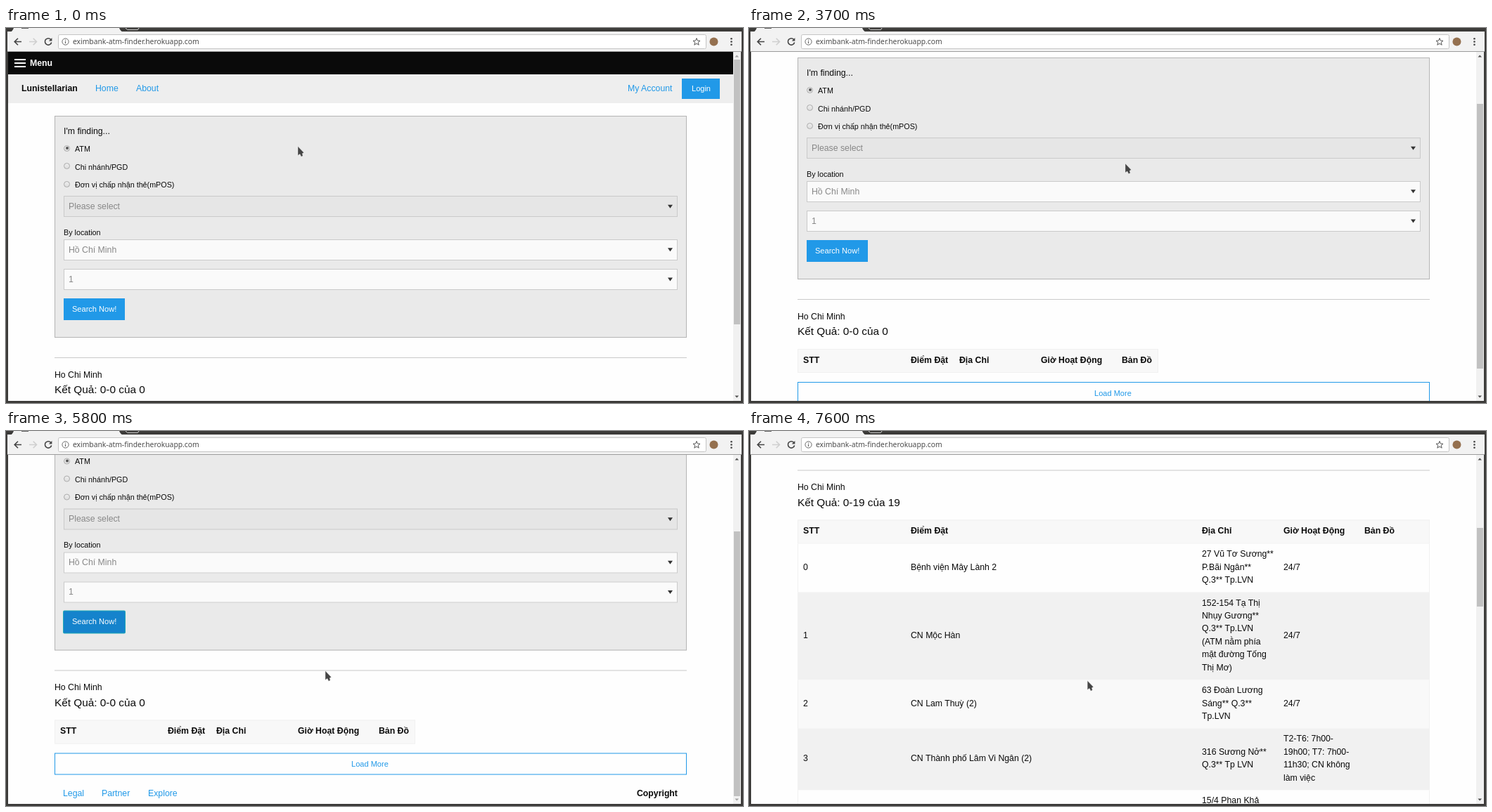
Recreate the animation shown at these times as an HTML page. Size 1048 by 534 pixels, loop 8000 ms.

```html
<!DOCTYPE html>
<html lang="vi">
<head>
<meta charset="utf-8">
<title>ATM finder</title>
<style>
html, body { margin: 0; width: 100%; height: 100%; overflow: hidden; background: #3c3b39; }
#stage { position: relative; width: 1048px; height: 534px; overflow: hidden; color: #0a0a0a; font-family: "Liberation Sans", Arial, sans-serif; }
#stage div, #stage span, #stage svg { position: absolute; box-sizing: border-box; }
#stage span { white-space: nowrap; line-height: 1; transform-origin: 0 50%; transform: translateY(-50%) scale(.7672); }
#view { left: 3px; top: 34px; width: 1042px; height: 497px; overflow: hidden; background: #fefefe; }
#doc { left: -3px; top: -34px; width: 1034px; }
.link { color: #2199e8; }
.bold { font-weight: bold; }
.hint { color: #888; }
.white { color: #fefefe; }
.row { background: #fefefe; border: solid #f1f1f1; border-width: 0 1px; }
.row.odd { background: #f1f1f1; }
.row.hover { background: #f9f9f9; }
.row.odd.hover { background: #ececec; }
</style>
</head>
<body>
<div id="stage">
  <div id="chrome"></div>
  <div id="view"><div id="doc"></div></div>
  <div id="bar"></div>
  <svg id="cursor" width="24" height="24" overflow="visible">
    <path id="arrow" d="M0 0V13L2.9 11L4.8 14.8L7.2 13.5L6.3 10.3L8.6 9Z" fill="#454545" stroke="#f6f6f6" stroke-width=".4"/>
    <path id="hand" d="M3 .8Q4.4-.6 5.6 1L6.7 5.2L12.2 6.3Q14.4 7 14.2 9.4L13.2 15.6H6L1.2 10.8Q.2 9 2 8.6L4.5 9.6Z" fill="#454545" stroke="#f6f6f6" stroke-width=".8"/>
  </svg>
</div>
<script>
const LOOP = 8000;
const $ = id => document.getElementById(id);

// Boxes use stage pixels; text is set at page size and scaled with the window.
const box = (x, y, w, h, css = '', id = '', cls = '') =>
  `<div id="${id}" class="${cls}" style="left:${x}px;top:${y}px;width:${w}px;height:${h}px;${css}"></div>`;
const text = (x, y, str, cls = '', size = 16) =>
  `<span class="${cls}" style="left:${x}px;top:${y}px;font-size:${size}px">${str}</span>`;
const svg = body => `<svg width="1048" height="534" style="left:0;top:0" fill="none">${body}</svg>`;

function browserChrome() {
  return box(2, 5, 1044, 29, 'background:#f2f2f2;border-bottom:1px solid #9b9b9b') +
    svg(`
      <path d="M6 6Q9 5 11 0H161Q163 5 167 6Z" fill="#f2f2f2"/>
      <path d="M22 0H32" stroke="#333" stroke-width="1.5"/>
      <path d="M170 0L172.5 2.5H187.5L189 0" stroke="#ccc"/>
      <rect x="74.5" y="9.5" width="921" height="20" rx="2" fill="#fff" stroke="#c4c4c4"/>
      <path d="M22 19.5H12.5M17 14.7L12.2 19.5L17 24.3" stroke="#444" stroke-width="1.6"/>
      <path d="M33 19.5H43M38.7 14.7L43.5 19.5L38.7 24.3" stroke="#cfcfcf" stroke-width="1.6"/>
      <path d="M63.6 16.2A4.7 4.7 0 1 0 64.7 20.5" stroke="#444" stroke-width="1.6"/>
      <path d="M65.4 14V18.6H60.8Z" fill="#444"/>
      <circle cx="84.5" cy="19.5" r="4.6" stroke="#666"/>
      <path d="M84.5 18.8V22M84.5 16.7V17.8" stroke="#666" stroke-width="1.2"/>
      <path d="M982 14.5L983.4 18L987 18.2L984.2 20.5L985.2 24.2L982 22.1L978.8 24.2L979.8 20.5L977 18.2L980.6 18Z" stroke="#555"/>
      <circle cx="1006.5" cy="19.5" r="6" fill="#94704f"/>
      <g fill="#444"><circle cx="1031.5" cy="15.2" r="1.3"/><circle cx="1031.5" cy="19.5" r="1.3"/><circle cx="1031.5" cy="23.8" r="1.3"/></g>`) +
    `<span style="left:94.5px;top:19.5px;font:13.45px/1 'Noto Sans',sans-serif;color:#4c4c4c">eximbank-atm-finder.herokuapp.com</span>`;
}

const select = (y, label, fill) =>
  box(82, y, 873, 30, `background:${fill};border:1px solid #cacaca`) +
  text(88.5, y + 15, label, 'hint') +
  svg(`<path d="M941 ${y + 12.7}H948L944.5 ${y + 17.7}Z" fill="#333"/>`);

const radio = (y, label, on) =>
  box(82.3, y - 5.3, 9.2, 9.2, 'border:1px solid #aaa;border-radius:50%;background:linear-gradient(#eee,#ddd)') +
  (on ? box(84.9, y - 2.7, 4, 4, 'border-radius:50%;background:#555') : '') +
  text(98, y, label, '', 14);

function form() {
  return box(3, 34, 1031, 31.5, 'background:#0a0a0a') +
    [44, 49.2, 54.4].map(y => box(12, y, 15.5, 1.5, 'background:#fefefe')).join('') +
    text(34, 49.5, 'Menu', 'bold white') +
    box(3, 65.5, 1031, 41.5, 'background:#eee') +
    text(21.5, 86, 'Lunistellarian', 'bold') + text(127, 86, 'Home', 'link') +
    text(185, 86, 'About', 'link') + text(884, 86, 'My Account', 'link') +
    box(961, 71.5, 54, 29.5, 'background:#2199e8') + text(974.5, 86.3, 'Login', 'white', 14.4) +
    box(69, 125, 899, 316, 'background:#eaeaea;border:1px solid #b4b4b4') +
    text(82, 147, "I'm finding...") +
    radio(172, 'ATM', true) + radio(197.5, 'Chi nhánh/PGD') + radio(222.8, 'Đơn vị chấp nhận thẻ(mPOS)') +
    select(239, 'Please select', '#e6e6e6') + text(82, 290.5, 'By location', '', 14) +
    select(300.5, 'Hồ Chí Minh', '#fafafa') + select(342.8, '1', '#fafafa') +
    box(82, 385, 87, 31, '', 'search') + text(93.7, 400.4, 'Search Now!', 'white', 14.4) +
    box(69, 468.5, 899, 1, 'background:#cacaca') + text(69, 493.5, 'Ho Chi Minh');
}

const HEADS = ['STT', 'Điểm Đặt', 'Địa Chỉ', 'Giờ Hoạt Động', 'Bản Đồ'];
const resultHead = (range, width, cols) =>
  text(69, 515.4, 'Kết Quả: ' + range, '', 20) +
  box(69, 540, width, 34, 'background:#f8f8f8;border:1px solid #f1f1f1') +
  HEADS.map((h, i) => text(cols[i], 556.4, h, 'bold')).join('');

function emptyResults() {
  return resultHead('0-0 của 0', 513, [77, 230, 299, 414.5, 530]) +
    box(69, 586.5, 899, 31, 'border:1px solid #2199e8') + text(491.3, 602.5, 'Load More', 'link', 14.4) +
    text(81, 644.5, 'Legal', 'link') + text(136, 644.5, 'Partner', 'link') +
    text(201.5, 644.5, 'Explore', 'link') + text(897, 644.5, 'Copyright', 'bold');
}

const ROWS = [
  ['Bệnh viện Mây Lành 2', '27 Vũ Tơ Sương**|P.Bãi Ngân**|Q.3** Tp.LVN', '24/7'],
  ['CN Mộc Hàn', '152-154 Tạ Thị|Nhụy Gương**|Q.3** Tp.LVN|(ATM nằm phía|mặt đường Tống|Thị Mơ)', '24/7'],
  ['CN Lam Thuỳ (2)', '63 Đoàn Lương|Sáng** Q.3**|Tp.LVN', '24/7'],
  ['CN Thành phố Lâm Vi Ngân (2)', '316 Sương Nở**|Q.3** Tp LVN', 'T2-T6: 7h00-|19h00; T7: 7h00-|11h30; CN không|làm việc'],
  ['CN Hạ Liễu', '15/4 Phan Khả|Mịn** Q.3**|Tp.LVN', '24/7']
];
const rowSpans = [];

function fullResults() {
  const cols = [77, 230, 644, 759.5, 875], line = 18.45;
  let y = 574.3;
  return resultHead('0-19 của 19', 899, cols) +
    ROWS.map((row, i) => {
      const cells = [String(i), ...row].map(c => c.split('|'));
      const h = line * Math.max(...cells.map(c => c.length)) + 13.8;
      const mid = y + h / 2 - 1;
      const out = box(69, y, 899, h, '', '', i % 2 ? 'row odd' : 'row') +
        cells.map((c, k) => c.map((s, n) => text(cols[k], mid + (n - (c.length - 1) / 2) * line, s)).join('')).join('');
      rowSpans.push([y, y + h]);
      y += h;
      return out;
    }).join('');
}

$('chrome').innerHTML = browserChrome();
$('doc').innerHTML = form() + `<div id="empty">${emptyResults()}</div><div id="full">${fullResults()}</div>`;
$('bar').innerHTML = box(1034, 34, 10.5, 497, 'background:#f1f1f1') +
  box(1035, 45, 8.5, 377, 'background:#c1c1c1', 'thumb') +
  svg('<path id="up" d="M1036.5 41.5H1042L1039.2 38.5Z"/><path id="down" d="M1036.5 523.5H1042L1039.2 526.5Z"/>');
const rows = document.querySelectorAll('.row');

// [time, x, y]
const POINTER = [
  [0, 415, 168.5], [300, 417, 169], [400, 424, 170], [500, 438, 172.5], [600, 459, 176],
  [700, 484, 180.5], [800, 509, 185], [900, 527, 188], [1000, 534, 189.5],
  [2100, 534.5, 191.5], [3200, 535, 193], [4300, 535.3, 202], [4500, 445, 262],
  [4700, 290, 258], [4800, 188, 252.5], [5000, 144, 264.5], [5700, 300, 308],
  [5800, 454, 341.5], [6000, 472, 351.5], [6200, 474.3, 352], [6800, 475.3, 353],
  [7000, 476.7, 354], [7300, 479, 355], [7600, 481.2, 355.5]
];
// [time, scroll offset]
const SCROLL = [
  [0, 0], [3200, 17], [3300, 41], [3700, 83], [3900, 122], [4000, 128.5],
  [6600, 130.5], [6800, 190], [7000, 256.7], [7100, 285], [7300, 363], [7600, 413.5]
];
const BUTTON = [[0, '#2199e8'], [5000, '#1e92df'], [5200, '#1786d0'], [5400, '#1583cc']];

const at = (steps, t) => steps.findLast(s => s[0] <= t);

function draw(t) {
  const [, x, y] = at(POINTER, t), scroll = at(SCROLL, t)[1];
  const found = t >= 6000, hand = t >= 5000 && t < 5700, focused = t >= 5700;
  $('cursor').style.transform = `translate(${x}px,${y}px)`;
  $('arrow').style.display = hand ? 'none' : '';
  $('hand').style.display = hand ? '' : 'none';
  $('doc').style.transform = `translateY(${-scroll}px)`;
  $('empty').style.display = found ? 'none' : '';
  $('full').style.display = found ? '' : 'none';
  rowSpans.forEach(([top, bottom], i) =>
    rows[i].classList.toggle('hover', y + scroll >= top && y + scroll < bottom));
  $('search').style.background = at(BUTTON, t)[1];
  $('search').style.boxShadow = focused ? '0 0 0 1px #20a9b8' : 'none';
  $('search').style.borderRadius = focused ? '1px' : '0';
  $('thumb').style.top = 45 + scroll * (found ? .2244 : .761) + 'px';
  $('thumb').style.height = (found ? 112 : 377) + 'px';
  $('up').style.fill = scroll ? '#505050' : '#a3a3a3';
  $('down').style.fill = !found && scroll >= 128 ? '#a3a3a3' : '#505050';
}

const start = performance.now();
function tick() {
  draw((performance.now() - start) % LOOP);
  requestAnimationFrame(tick);
}
tick();
</script>
</body>
</html>
```
